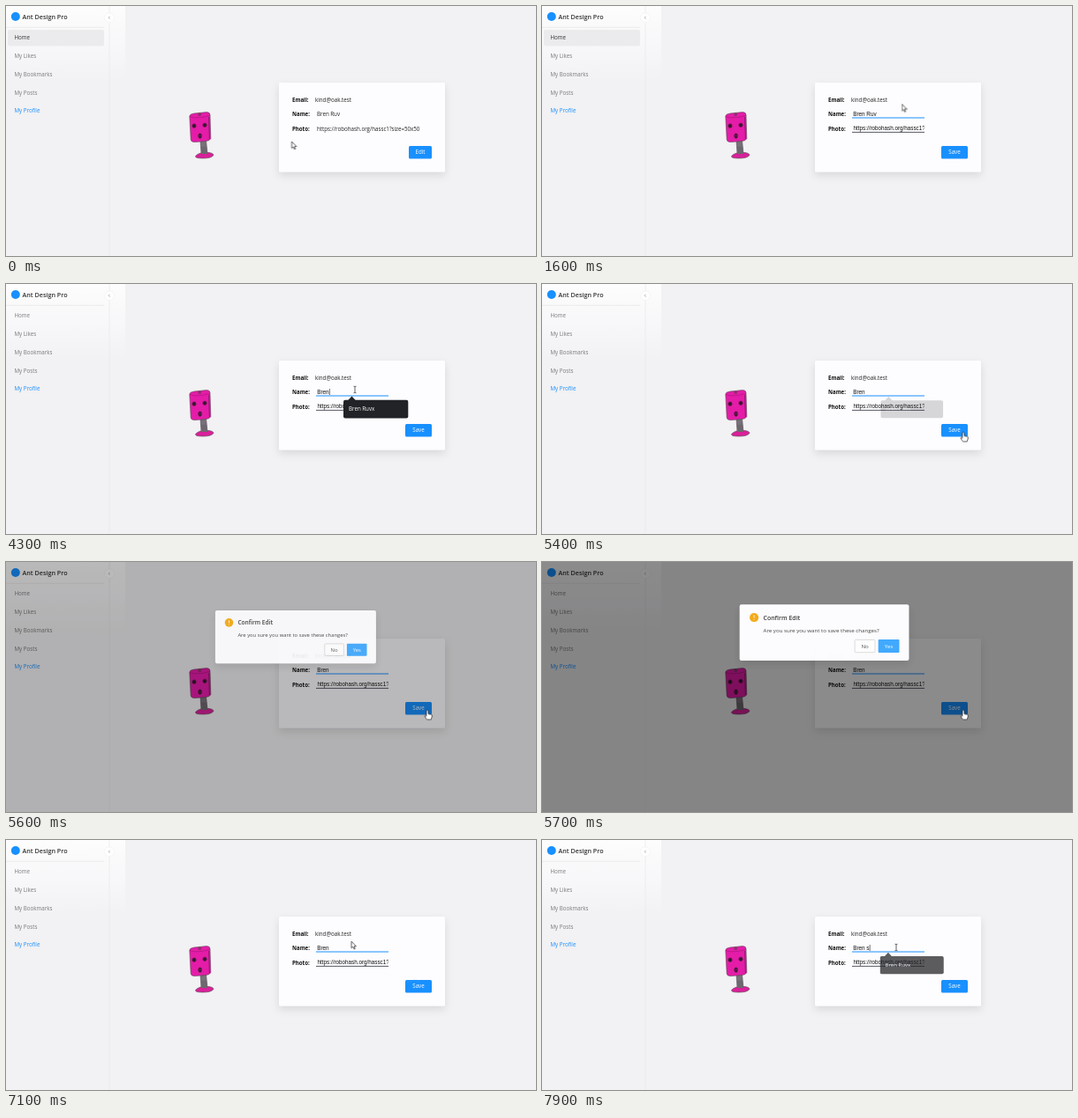
An HTML page for the animation above (8000 ms loop, 600 by 284 pixels).

```html
<!DOCTYPE html>
<html lang="en">
<head>
<meta charset="utf-8">
<title>Profile editor</title>
<style>
  html, body { margin: 0; width: 100%; height: 100%; overflow: hidden; background: #f2f1f3; }
  svg { display: block; width: 600px; height: 284px; }
  text { font: 6.2px "Open Sans", "Noto Sans", sans-serif; fill: #222; white-space: pre; }
  .brand { font-size: 7.2px; font-weight: 600; fill: #333; }
  .menu text { fill: #7a797b; }
  .menu .active { fill: #1890ff; }
  .label { font-size: 6.1px; font-weight: 700; fill: #111; }
  .input { font: 6.3px "Liberation Sans", Arial, sans-serif; fill: #111; }
  .button { fill: #1890ff; }
  .mid { text-anchor: middle; }
  .light { fill: #fff; }
  .title { font-size: 7px; font-weight: 600; fill: #3c3c3c; }

  /* One shared 8 s timeline: 1% is 80 ms. */
  .view, .edit, .home, .hover, .tip, .mask, .modal, .no, .no-text, .yes,
  .pointer, .arrow, .hand, .beam { animation: 8s linear infinite; }

  .view { animation-name: view; animation-timing-function: step-end; }
  .edit { animation-name: edit; animation-timing-function: step-end; }
  @keyframes view { 0% { visibility: visible } 13.75%, 100% { visibility: hidden } }
  @keyframes edit { 0% { visibility: hidden } 13.75%, 100% { visibility: visible } }

  .menu .home { animation-name: home; }
  .hover { animation-name: hover; }
  @keyframes home { 0%, 50% { fill: #333 } 53%, 100% { fill: #7a797b } }
  @keyframes hover { 0%, 50% { opacity: 1 } 53%, 100% { opacity: 0 } }

  .tip { animation-name: tip; transform-origin: 419px 142px; }
  @keyframes tip {
    0%, 28.75% { opacity: 0; transform: none }
    30%, 66.6% { opacity: 1; transform: none }
    67.5% { opacity: .18; transform: scale(.965) }
    67.9%, 92.5% { opacity: 0; transform: none }
    93.5%, 98.25% { opacity: 1; transform: none }
    98.75% { opacity: .74; transform: scale(.985) }
    100% { opacity: .2; transform: scale(.965) }
  }

  .mask { animation-name: mask; }
  @keyframes mask {
    0%, 68.5% { opacity: 0 }
    71%, 85.5% { opacity: .45 }
    88%, 100% { opacity: 0 }
  }

  /* The dialog grows from, and shrinks back to, the Save click. */
  .modal { animation-name: modal; transform-origin: 483px 177px; }
  @keyframes modal {
    0% { opacity: 0; transform: scale(.2) }
    68.5% { opacity: 0; transform: scale(.2); animation-timing-function: cubic-bezier(.08, .82, .17, 1) }
    72.25% { opacity: 1; transform: none }
    85.5% { opacity: 1; transform: none; animation-timing-function: cubic-bezier(.78, .14, .15, .86) }
    89.25%, 100% { opacity: 0; transform: scale(.2) }
  }

  .no { animation-name: no; animation-timing-function: step-end; fill: #fff; stroke-width: .7; }
  .no-text { animation-name: no-text; animation-timing-function: step-end; }
  .yes { animation-name: yes; animation-timing-function: step-end; }
  @keyframes no { 0% { stroke: #cfcfcf } 82.5%, 100% { stroke: #1890ff } }
  @keyframes no-text { 0% { fill: #555 } 82.5%, 100% { fill: #40a9ff } }
  @keyframes yes { 0% { fill: #40a9ff } 84.4%, 100% { fill: #1890ff } }

  .pointer { animation-name: pointer; animation-timing-function: ease-in-out; }
  @keyframes pointer {
    0%, 2.5% { transform: translate(323.5px, 154px) }
    11.25%, 14% { transform: translate(470px, 166px) }
    20%, 22.5% { transform: translate(407.5px, 111.5px) }
    25.5%, 57.5% { transform: translate(395px, 120px) }
    65%, 73.75% { transform: translate(477px, 168.5px) }
    82.5%, 86.25% { transform: translate(357px, 92px) }
    90%, 100% { transform: translate(401px, 122px) }
  }
  .arrow { animation-name: arrow; animation-timing-function: step-end; }
  .hand { animation-name: hand; animation-timing-function: step-end; }
  .beam { animation-name: beam; animation-timing-function: step-end; }
  @keyframes arrow {
    0%, 14.4%, 58.75%, 74.4%, 85.6% { visibility: visible }
    11.5%, 23.75%, 63.75%, 81.9%, 89.4%, 100% { visibility: hidden }
  }
  @keyframes hand {
    0%, 14.4%, 74.4%, 85.6%, 100% { visibility: hidden }
    11.5%, 63.75%, 81.9% { visibility: visible }
  }
  @keyframes beam {
    0%, 58.75%, 100% { visibility: hidden }
    23.75%, 89.4% { visibility: visible }
  }
</style>
</head>
<body>
<svg viewBox="0 0 600 284">
  <defs>
    <linearGradient id="glow" x2="0" y2="1">
      <stop stop-color="#fdfdfd"/>
      <stop offset=".5" stop-color="#f8f7f9"/>
      <stop offset="1" stop-color="#f2f1f3"/>
    </linearGradient>
    <filter id="shadow" x="-20%" y="-20%" width="140%" height="150%">
      <feDropShadow dx="0" dy="4" stdDeviation="5" flood-opacity=".11"/>
    </filter>
    <clipPath id="field"><rect x="351" y="132" width="81.8" height="12"/></clipPath>
  </defs>

  <rect width="600" height="284" fill="#f2f1f3"/>
  <rect width="135" height="84" fill="url(#glow)"/>

  <!-- Sidebar -->
  <path d="M117 0V284" stroke="#ebeaec" stroke-width=".8"/>
  <path d="M0 24.3H111" stroke="#e9e8ea" stroke-width=".8"/>
  <circle cx="10.8" cy="12" r="5" fill="#1890ff"/>
  <text class="brand" x="18.5" y="14.6">Ant Design Pro</text>
  <circle cx="117" cy="13.2" r="5.3" fill="#fff" stroke="#ececec" stroke-width=".5"/>
  <path d="M117.7 11.6L116.1 13.2L117.7 14.8" fill="none" stroke="#888" stroke-width=".6"/>
  <rect class="hover" x="2" y="27" width="109" height="18.6" rx="2" fill="#ebeaec"/>
  <g class="menu">
    <text class="home" x="9.5" y="38.4">Home</text>
    <text x="9.5" y="59.2">My Likes</text>
    <text x="9.5" y="80">My Bookmarks</text>
    <text x="9.5" y="100.7">My Posts</text>
    <text class="active" x="9.5" y="121.4">My Profile</text>
  </g>

  <!-- Robot -->
  <g stroke="#5a4a55" stroke-width=".6">
    <path d="M220 153L226.5 152.5L228 168H221Z" fill="#77717a"/>
    <path d="M214.5 170.5Q218 166.5 226 166.3Q235 166.5 235 169.5Q232 173.3 222 173Q214 173 214.5 170.5Z" fill="#d9209a"/>
    <path d="M221 160L227 159.5L228 168H221Z" fill="#6d676f" stroke="none"/>
    <path d="M207.8 125Q208.2 122.6 213 122L227 120.6Q230.8 120.6 231 123.4L231.8 150.5Q231 153 226 153.6L214 154.6Q209.6 154.6 209.2 152Z" fill="#e41ca8"/>
    <path d="M208 125.5Q212 127.6 220 126.6Q229 125.6 231 123.6" fill="none" stroke="#a51678"/>
    <path d="M229.6 126L230.4 151" stroke="#9d1674" stroke-width="1.1"/>
    <circle cx="219.3" cy="123.2" r="1.5" fill="#b9187f"/>
    <g fill="#33182c" stroke="#8d1768">
      <ellipse cx="213" cy="136.2" rx="2.2" ry="2.4"/>
      <ellipse cx="225" cy="135.3" rx="2.2" ry="2.4"/>
      <ellipse cx="219.6" cy="147.6" rx="2" ry="2.8"/>
    </g>
    <path d="M218.6 147.4H220.6" stroke="#e41ca8"/>
  </g>

  <!-- Profile card -->
  <rect x="309" y="87" width="188" height="101.5" rx="1.5" fill="#fdfcfe" filter="url(#shadow)"/>
  <text class="label" x="324" y="108.8">Email:</text>
  <text class="label" x="324" y="125.3">Name:</text>
  <text class="label" x="324" y="142">Photo:</text>
  <text x="350" y="108.8">kind@oak.test</text>
  <g class="view">
    <text x="352" y="125.3">Bren Ruv</text>
    <text x="352" y="142">https://robohash.org/hassc1?size=50x50</text>
    <rect class="button" x="456" y="159" width="26" height="14.5" rx="1.5"/>
    <text class="mid light" x="469" y="168.4">Edit</text>
  </g>
  <g class="edit">
    <text class="input" id="name" x="352.3" y="124.6"></text>
    <rect id="caret" y="119" width=".6" height="7" fill="#111"/>
    <path d="M351 127H433" stroke="#1890ff"/>
    <g clip-path="url(#field)">
      <text class="input" x="352.5" y="141">https://robohash.org/hassc1?size=50x50</text>
    </g>
    <path d="M351 143.4H433" stroke="#2c3040" stroke-width=".8"/>
    <rect class="button" x="452" y="159" width="30" height="14.5" rx="1.5"/>
    <text class="mid light" x="467" y="168.4">Save</text>
  </g>

  <g class="tip">
    <path d="M386.8 132.5L391.5 127.6L396.2 132.5Z" fill="#212326"/>
    <rect x="382" y="131.8" width="73.3" height="20.7" rx="2" fill="#212326"/>
    <text class="light" x="388" y="144.3">Bren Ruvx</text>
  </g>

  <!-- Confirmation -->
  <rect class="mask" width="600" height="284"/>
  <g class="modal">
    <rect x="222" y="47.5" width="193" height="64" rx="2" fill="#fdfcfe" filter="url(#shadow)"/>
    <circle cx="238.5" cy="62.3" r="5.1" fill="#f5ab17"/>
    <path d="M238.5 59.5V63M238.5 64.2V65.1" stroke="#fff" stroke-width=".8"/>
    <text class="title" x="249" y="64.9">Confirm Edit</text>
    <text x="249" y="79" style="fill:#444">Are you sure you want to save these changes?</text>
    <rect class="no" x="353.3" y="87.8" width="23" height="14.4" rx="1"/>
    <text class="no-text mid" x="364.8" y="97.3">No</text>
    <rect class="yes" x="380" y="87.5" width="24" height="15" rx="1"/>
    <text class="mid light" x="392" y="97.3">Yes</text>
  </g>

  <!-- Pointer -->
  <g class="pointer" fill="#fff" stroke="#222" stroke-width=".7" stroke-linejoin="round">
    <path class="arrow" d="M0 0V7.6L1.8 6L3 8.8L4.2 8.3L3.1 5.6H5.4Z"/>
    <path class="hand" d="M-1 .2Q0-.8 1 .2V4L5 5Q5.6 5.4 5.3 7L4.2 10.5H-.4L-3 6.8Q-3 5.4-1.8 5.9L-1 6.7Z"/>
    <path class="beam" fill="none" d="M-1.5-3.8Q0-3.8 0-3Q0-3.8 1.5-3.8M0-3V3M-1.5 3.8Q0 3.8 0 3Q0 3.8 1.5 3.8"/>
  </g>
</svg>
<script>
  const LOOP = 8000;
  const field = document.getElementById('name');
  const caret = document.getElementById('caret');
  // Clicks and key presses: time in ms, field value afterwards.
  const edits = [
    [0, 'Bren Ruv'], [2150, 'Bren Ruv'], [3500, 'Bren Ru'], [3700, 'Bren R'], [3900, 'Bren '],
    [4100, 'Bren'], [7300, 'Bren'], [7600, 'Bren '], [7850, 'Bren s']
  ];
  let start;

  function draw(now) {
    start ??= now;
    const t = (now - start) % LOOP;
    const [time, value] = edits.findLast(e => e[0] <= t);
    if (field.textContent !== value) field.textContent = value;
    const focused = (t >= 2150 && t < 5350) || t >= 7300;
    const lit = (t - time) % 1000 < 500;
    caret.setAttribute('x', 352.6 + field.getComputedTextLength());
    caret.style.opacity = focused && lit ? 1 : 0;
    requestAnimationFrame(draw);
  }
  requestAnimationFrame(draw);
</script>
</body>
</html>
```
